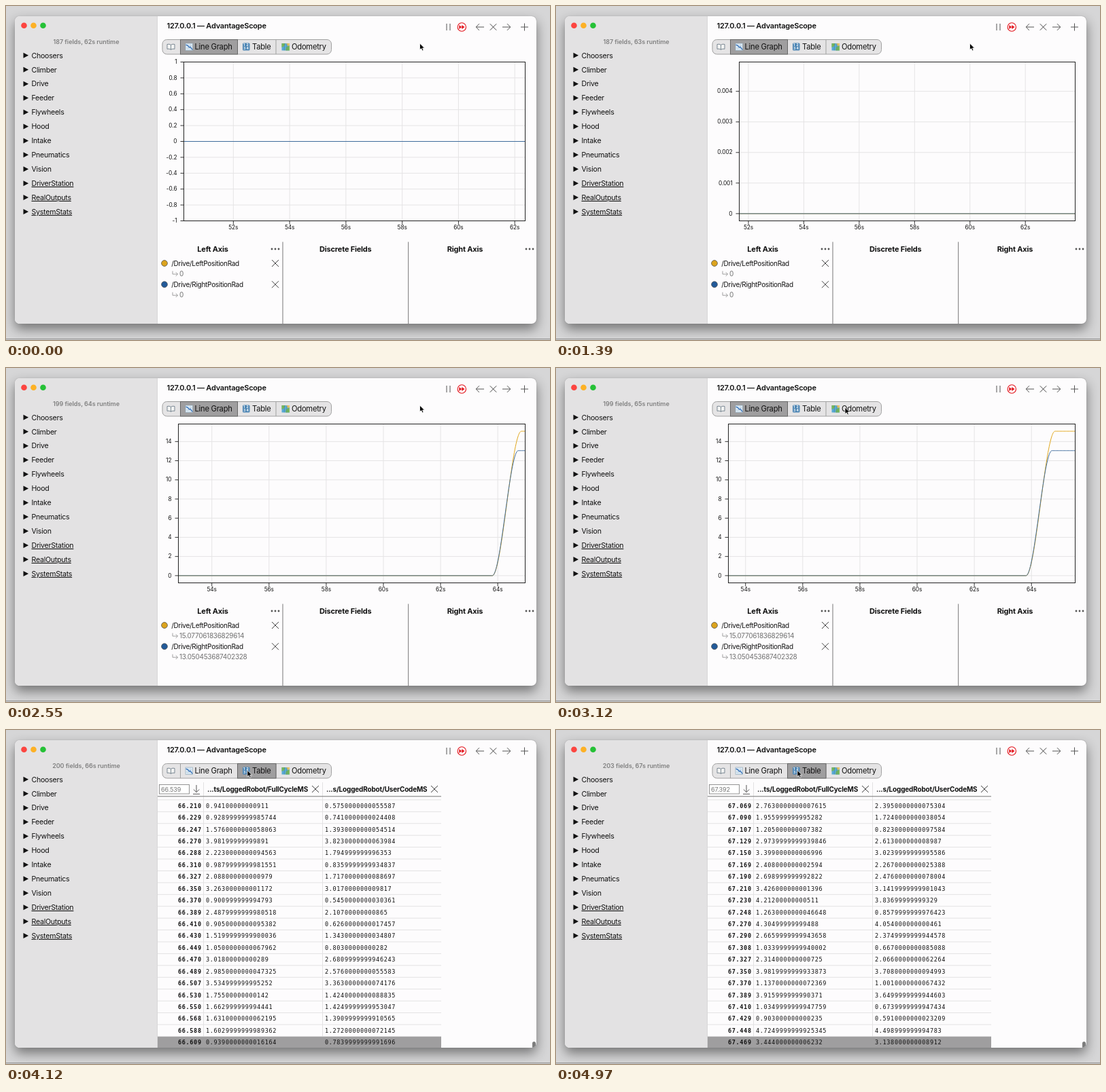
Animation of 800 by 492 pixels, one loop 5000 ms. Source, as an HTML page:

```html
<!DOCTYPE html>
<html lang="en">
<head>
<meta charset="utf-8">
<title>Log viewer</title>
<style>
html, body { margin: 0; width: 100%; height: 100%; overflow: hidden; background: #d6d6d7; }
#win { position: absolute; left: 13px; top: 15px; width: 767px; height: 453px; border-radius: 7px;
  background: #fdfcfd; box-shadow: 0 0 1px #777, 0 8px 17px rgba(0,0,0,.46); }
#edge { position: absolute; left: 0; top: 490px; width: 800px; height: 1px; background: #8d8d8d; }
svg { position: absolute; left: 0; top: 0; display: block; }
text { font: 10px Inter, sans-serif; letter-spacing: -.28px; fill: #111; white-space: pre; }
.title { font-size: 11px; font-weight: 600; letter-spacing: -.22px; }
.info { font-size: 9px; font-weight: 600; letter-spacing: -.06px; fill: #808080; }
.side { font-size: 10.6px; letter-spacing: -.25px; }
.under { text-decoration: underline; text-decoration-thickness: .8px; text-underline-offset: 1px; }
.tab { font-size: 11.2px; letter-spacing: -.25px; }
.digit { font-size: 5px; font-weight: 700; fill: #fff; }
.axis { font-size: 8.3px; letter-spacing: -.1px; }
.head { font-size: 11px; font-weight: 700; letter-spacing: -.2px; }
.col { font-weight: 700; letter-spacing: -.18px; }
.value { fill: #707070; }
.time { font-size: 9px; letter-spacing: -.1px; fill: #777; }
.mono, .stamp { font: 8.5px "DejaVu Sans Mono", monospace; letter-spacing: .66px; }
.stamp { font-weight: 700; }
</style>
</head>
<body>
<div id="win"></div>
<div id="edge"></div>
<svg width="800" height="492" viewBox="0 0 800 492">
  <defs><clipPath id="frame"><rect x="13" y="15" width="767" height="453" rx="7"/></clipPath></defs>
  <g clip-path="url(#frame)"><g id="back"></g><g id="view"></g></g>
  <path id="cursor" d="M0 0V9.6L2.2 7.6 3.8 11 5.5 10.2 4 7H7Z" fill="#000" stroke="#fff" stroke-width=".8"/>
</svg>
<script>
const $ = id => document.getElementById(id);
const LOOP = 5000, ENABLE = 1400, SWITCH = 3420;
const SPAN = 12.13, TOP = 82.5, BOTTOM = 316.5, RIGHT = 763.5;

const clamp = v => Math.min(1, Math.max(0, v));
const smooth = p => (p = clamp(p), p * p * (3 - 2 * p));

// Loop time in ms to log time in seconds, which drifts slightly
const clock = [[0, 62.37], [760, 63.17], [3700, 66.109], [4480, 66.908], [4970, 67.392]];
const logTime = t => clock.slice(1).reduce((now, [b, q], i) => {
  const [a, p] = clock[i];
  return t < a ? now : p + (q - p) * clamp((t - a) / (b - a));
}, 0);

// Wheel positions by 20 ms tick; the robot starts moving just after tick 0
const FIRST = 3190;
const leftPos = k => 15.077061836829614 * smooth((k - .5) / 50.76);
const rightPos = k => 13.050453687402328 * smooth((k - .5) / 45.354);

const text = (x, y, s, cls = "", anchor = "start") =>
  `<text x="${x}" y="${y}" class="${cls}" text-anchor="${anchor}">${s}</text>`;
const path = (d, stroke = "#555", width = 1, fill = "none") =>
  `<path d="${d}" stroke="${stroke}" stroke-width="${width}" fill="${fill}"/>`;
const shape = (d, fill) => path(d, "none", 0, fill);
const rect = (x, y, w, h, fill, more = "") =>
  `<rect x="${x}" y="${y}" width="${w}" height="${h}" fill="${fill}" ${more}/>`;
const circle = (x, y, r, fill, more = "") => `<circle cx="${x}" cy="${y}" r="${r}" fill="${fill}" ${more}/>`;
const cross = (x, y, r = 5) => path(`M${x - r} ${y - r}l${2 * r} ${2 * r}m0 ${-2 * r}l${-2 * r} ${2 * r}`, "#444");
const dots = (x, y) => [-5, 0, 5].map(d => circle(x + d, y, 1.4, "#555")).join("");

function background() {
  const lights = ["#fc4540", "#fdb125", "#25c136"].map((c, i) => circle(26.5 + 14 * i, 28.7, 4.3, c)).join("");
  const fields = ["Choosers", "Climber", "Drive", "Feeder", "Flywheels", "Hood", "Intake", "Pneumatics",
    "Vision", "DriverStation", "RealOutputs", "SystemStats"].map((name, i) => {
    const y = 72.8 + 20.93 * i;
    return shape(`M25.5 ${y - 4}v8l7.6 -4z`, "#111") + text(37.5, y + 3.8, name, i > 8 ? "side under" : "side");
  }).join("");
  return rect(13, 15, 209, 453, "#e3e2e3") + rect(222, 15, 1, 453, "#d8d7d8") + lights + fields +
    text(236.5, 33, "127.0.0.1 — AdvantageScope", "title") +
    path("M648 26v10M653 26v10") +
    circle(670.3, 31, 6.2, "none", 'stroke="#e3131b" stroke-width="1.1"') +
    shape("M666.3 28v6l4 -3zM670.3 28v6l4.2 -3z", "#e3131b") +
    path("M703 31H691.5M696 26.2L691.2 31 696 35.8M730 31H741.5M737 26.2L741.8 31 737 35.8M757 31H768M762.5 25.5V36.5") +
    cross(716.5, 31, 4.7);
}

function tabs(table) {
  const [x, w] = table ? [340.5, 56.5] : [256.5, 84];
  const digits = [0, 1, 2, 3].map(i => text(348.9 + i % 2 * 4.6, 59 + (i >> 1) * 5, i + 1, "digit")).join("");
  return rect(230, 49.5, 248.5, 21.5, "#e5e4e5", 'rx="6.5" stroke="#a0a0a0"') +
    path("M256.5 50v21M340.5 50v21M397 50v21", "#a0a0a0") +
    rect(x, 49.5, w, 21.5, "#9f9e9f", 'stroke="#666"') +
    path("M237 56.5q3 -1 5.5 .8q2.5 -1.8 5.5 -.8v6.8q-3 -.8 -5.5 .9q-2.5 -1.7 -5.5 -.9zM242.5 57.3v6.9", "#6d7c88", .9, "#f5f5f3") +
    rect(264, 55, 10.5, 10.5, "#dbe9f3", 'stroke="#8ea3b2" stroke-width=".6"') +
    path("M264 58.5h10.5M264 62h10.5M267.5 55v10.5M271 55v10.5", "#b6cad8", .5) +
    path("M264.5 57l3 1.5 2 2.5 1.5 -.8 3.2 4.3", "#2363b5", 1.2) +
    rect(348, 54.5, 10.5, 11, "#4f87b5", 'rx="1.5"') + digits +
    rect(405.5, 55, 11.5, 10.5, "#58a9d4") +
    shape("M405.5 55h5l-1 4 -4 2zM411 65.5l1 -5 5 -2v7z", "#77b65a") +
    shape("M412 55h5v3l-3 1z", "#e4c264") +
    path("M409.3 55v10.5M413.2 55v10.5", "#3c789b", .5) +
    text(277.5, 64, "Line Graph", "tab") + text(362, 64, "Table", "tab") + text(420, 64, "Odometry", "tab");
}

// Round step of 1, 2 or 5 that leaves about `target` pixels between lines
function stepSize(range, pixels, target) {
  const raw = range * target / pixels, base = 10 ** Math.floor(Math.log10(raw)), n = Math.round(raw / base);
  return base * (n < 2 ? 1 : n < 5 ? 2 : n < 9 ? 5 : 10);
}

const labelWidth = s => [...s].reduce((w, c) => w + (c == "." ? 2.5 : c == "-" ? 5 : 6.5), 0);

function graph(now) {
  const ticksNow = now * 50 - FIRST, tick = Math.floor(ticksNow + .2);
  const peak = Math.max(leftPos(tick + 1), rightPos(tick + 1));
  const [min, max] = peak ? [-.05 * peak, 1.05 * peak] : [-1, 1];
  const step = stepSize(max - min, BOTTOM - TOP, 40);
  const labels = [];
  for (let n = Math.ceil(min / step - 1e-6); n * step <= max + 1e-6; n++) labels.push(+(n * step).toFixed(6));
  const left = Math.round(240 + Math.max(...labels.map(v => labelWidth(String(v))))) + .5;
  const px = s => RIGHT - (now - s) * (RIGHT - left) / SPAN;
  const py = v => BOTTOM - (v - min) / (max - min) * (BOTTOM - TOP);

  let grid = "", marks = "", out = "";
  for (const v of labels) {
    const y = py(v);
    grid += `M${left} ${y}H${RIGHT}`;
    marks += `M${left} ${y}h-5`;
    out += text(left - 10, y + 2.7, v, "axis", "end");
  }
  for (let s = Math.ceil((now - SPAN) / 2) * 2; s <= now; s += 2) {
    const x = px(s);
    grid += `M${x} ${TOP}V${BOTTOM}`;
    marks += `M${x} ${BOTTOM}v5`;
    out += text(x, 329.3, s + "s", "axis", "middle");
  }
  const curve = (pos, color) => {
    let d = `M${left} ${py(0)}`;
    for (let k = 0; k < ticksNow; k++) d += `L${px((FIRST + k) / 50)} ${py(pos(k))}`;
    return path(d + `L${RIGHT} ${py(pos(ticksNow))}`, color);
  };
  const field = (y, name, color, pos) =>
    circle(233, y, 4.4, color, 'stroke="#555" stroke-width=".8"') +
    text(243.3, y + 3.6, name) + cross(396, y) +
    path(`M245 ${y + 11.5}v4.5h7.5m-2.8 -2.8l2.8 2.8 -2.8 2.8`, "#888", .8) +
    text(255, y + 19.2, pos(tick), "value");

  return path(grid, "#e5e4e5") + curve(leftPos, "#e0a61c") + curve(rightPos, "#3f6c9c") +
    path(marks, "#333") + rect(left, TOP, RIGHT - left, BOTTOM - TOP, "none", 'stroke="#222"') + out +
    path("M407 347.5V468M591.7 347.5V468", "#777") +
    text(304, 362, "Left Axis", "head", "middle") + text(499.3, 362, "Discrete Fields", "head", "middle") +
    text(675, 362, "Right Axis", "head", "middle") + dots(396, 358) + dots(770, 358) +
    field(379, "/Drive/LeftPositionRad", "#dca41d", leftPos) +
    field(410.2, "/Drive/RightPositionRad", "#225a99", rightPos);
}

// Repeatable random number in 0..1 for a row and a column
function random(row, col) {
  const s = Math.sin(row * 12.9898 + col * 78.233) * 43758.5453;
  return s - Math.floor(s);
}

// A cycle every 20 ms, logged up to 3 ms early; durations carry floating point residue
function logRow(i) {
  const stamp = 65.77 + i * .02 - Math.floor(random(i, 1) ** 2 * 4) / 1000;
  const full = .9 + 4 * random(i, 2) ** 2, user = full - .13 - .3 * random(i, 3);
  const ms = (v, col) => +v.toFixed(3) + (random(i, col) - .5) * 2e-11;
  return [stamp.toFixed(3), ms(full, 4), ms(user, 5)];
}

function logTable(now, t) {
  const last = Math.floor((now - 65.77) * 50 + 3.95);
  let out = rect(223, 451.7, 417, 17, "#9f9e9f"), lines = "";
  for (let r = 0; r < 21; r++) {
    const y = 111.6 + 17.425 * r, [stamp, full, user] = logRow(last - 20 + r);
    lines += `M223 ${y - 8.7}H640`;
    out += text(253, y + 3.1, stamp, "stamp") + text(294, y + 3.1, full, "mono") + text(469, y + 3.1, user, "mono");
  }
  return path(lines + "M290.5 77V468M465.5 77V468", "#e3e2e3") + out +
    path("M223 97.8H640", "#777") +
    rect(225.5, 80.5, 44, 13.5, "#fff", 'stroke="#888" stroke-width=".9"') +
    text(228, 90.5, now.toFixed(3), "time") +
    path("M280 81v10.5M275.8 87.5l4.2 4.2 4.2 -4.2M275 94.3h10") +
    text(296, 90.7, "...ts/LoggedRobot/FullCycleMS", "col") + cross(455, 87) +
    text(471, 90.7, "...s/LoggedRobot/UserCodeMS", "col") + cross(630, 87) +
    (t > 4100 ? rect(774, 459, 5, 11, "#7d7d7d", 'rx="2.5"') : "");
}

function draw() {
  const t = Math.floor(performance.now() % LOOP / 10) * 10;
  const now = logTime(t), table = t >= SWITCH;
  const count = t < ENABLE ? 187 : t < 3300 ? 199 : t < 4200 ? 200 : 203;
  $("view").innerHTML = text(118, 55.5, `${count} fields, ${Math.floor(now)}s runtime`, "info", "middle") +
    tabs(table) + (table ? logTable(now, t) : graph(now));
  const e = smooth((t - 2780) / 520);
  $("cursor").setAttribute("transform", `translate(${608.5 - 253.7 * e} ${55 + 4.3 * e})`);
  requestAnimationFrame(draw);
}

$("back").innerHTML = background();
draw();
</script>
</body>
</html>
```
